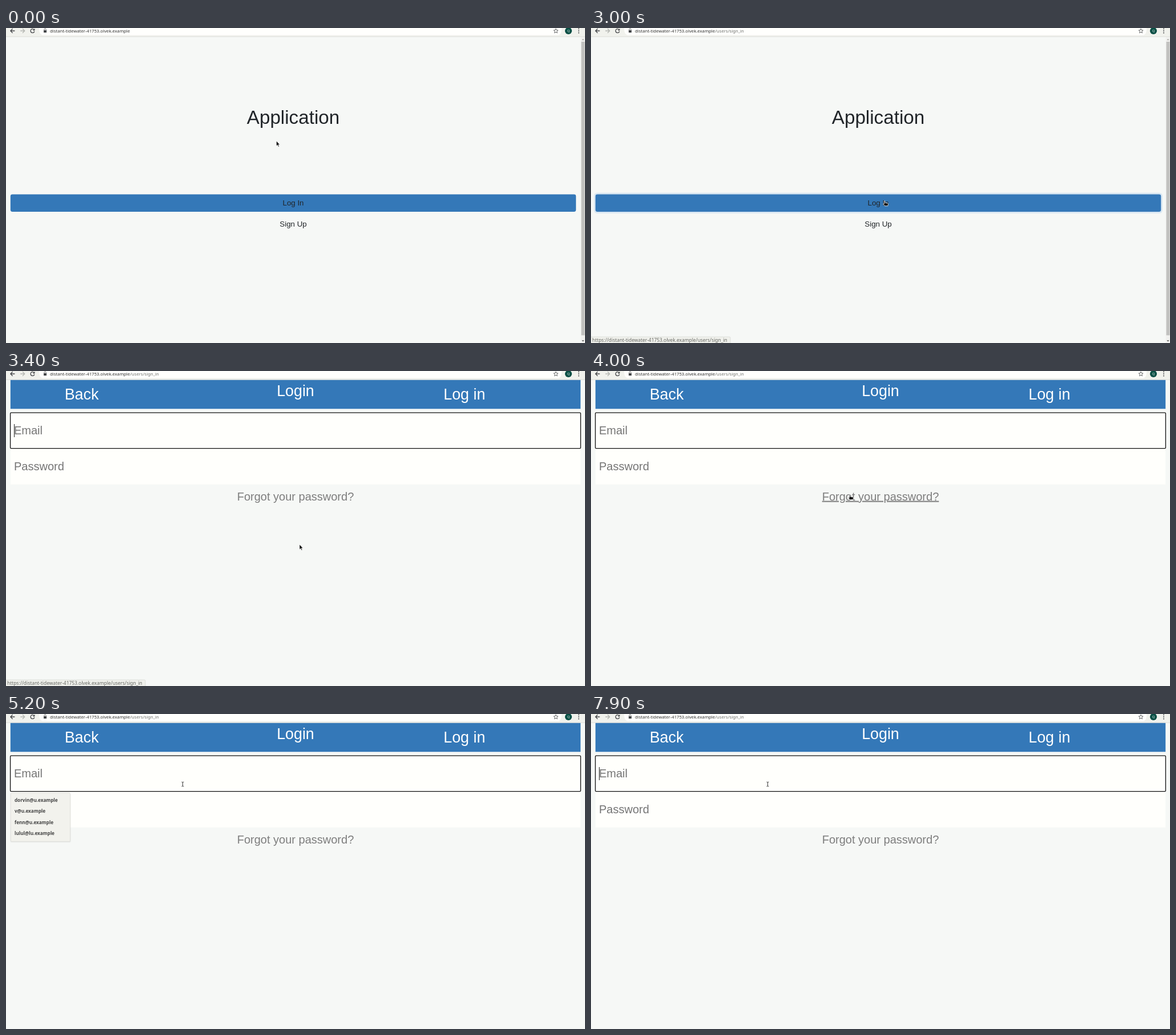
Animation, 1014 px wide and 552 px high, one loop 8 s. Source, as an HTML page:

```html
<!DOCTYPE html>
<html lang="en">
<head>
<meta charset="utf-8">
<title>Login walkthrough</title>
<style>
  html, body { margin: 0; width: 100%; height: 100%; overflow: hidden; background: #f6f8f6; }
  svg { display: block; width: 100vw; height: 100vh; }
  text { font-family: "Liberation Sans", Arial, sans-serif; white-space: pre; }
  .ui, .ui text { font-family: "Noto Sans", "Open Sans", sans-serif; }
  .mid { text-anchor: middle; }
  .field { font-size: 20px; fill: #757575; }
  .bar { font-size: 26.8px; fill: #fff; }
</style>
</head>
<body>
<svg viewBox="0 0 1014 552" preserveAspectRatio="none">
  <rect width="1014" height="552" fill="#f6f8f6"/>

  <g id="home">
    <text class="mid" x="503" y="167.6" font-size="33.2" fill="#212529">Application</text>
    <rect id="ring" x="5.2" y="288.7" width="995.6" height="36.1" rx="5.6" fill="#bdd7f0"/>
    <rect x="7.8" y="291.4" width="990.4" height="30.6" rx="3.4" fill="#3478b8"/>
    <text class="mid" x="503" y="311.3" font-size="13.3" fill="#212529">Log In</text>
    <text class="mid" x="503" y="348.3" font-size="13.3" fill="#212529">Sign Up</text>
    <rect x="1006.5" y="16" width="7.5" height="536" fill="#f1f1ef"/>
    <rect x="1007.5" y="24" width="6" height="514.5" fill="#c1c1bf"/>
    <path d="M1008.3 21.3l2.2-2.4 2.2 2.4z" fill="#a5a5a3"/>
    <path d="M1008.3 547.2l2.2 2.4 2.2-2.4z" fill="#505050"/>
  </g>

  <g id="login">
    <rect x="7.8" y="15.5" width="998.4" height="50.8" fill="#3478b8"/>
    <text class="bar mid" x="132.5" y="49.8">Back</text>
    <text class="bar mid" x="507" y="44.3">Login</text>
    <text class="bar mid" x="802.8" y="49.8">Log in</text>
    <rect x="7.8" y="73" width="998.4" height="125.8" fill="#fffffc"/>
    <rect x="7.6" y="73.1" width="998.8" height="62.6" rx="1.4" fill="none" stroke="#101010" stroke-width="1.3"/>
    <text id="email" class="field" x="14" y="111.2"></text>
    <rect id="caret" y="93" width="1" height="23" fill="#222"/>
    <text class="field" x="14" y="174.2">Password</text>
    <text id="forgot" class="mid" x="507" y="226.6" font-size="20" fill="#7d7d7d">Forgot your password?</text>
    <g id="menu" class="ui" font-size="8.1" font-weight="600" fill="#444">
      <rect x="7.5" y="139" width="106" height="86" rx="2" fill="#000" opacity=".07"/>
      <rect x="8.3" y="138.3" width="104" height="84.9" rx="1.5" fill="#f2f2ed" stroke="#d9d9d4" stroke-width=".6"/>
    </g>
  </g>

  <g class="ui">
    <rect width="1014" height="15" fill="#f1f2ed"/>
    <rect y="14.6" width="1014" height="1" fill="#dcddd8"/>
    <path d="M58 0H973Q973 12.6 966 12.6H66Q58 12.6 58 0z" fill="#fffffd"/>
    <g fill="none" stroke="#45474a" stroke-width="1.3">
      <path d="M15.4 5H8.2M11.6 1.3L7.9 5l3.7 3.7"/>
      <path d="M25.2 5h7.2M29 1.3L32.7 5 29 8.7" stroke="#b4b6b2"/>
      <path d="M49.2 3A3.4 3.4 0 1 0 49.8 5.8"/>
      <path d="M66.9 4.2V2.8a1.6 1.6 0 0 1 3.2 0v1.4" stroke-width=".8"/>
      <path d="M963 1.2l1.1 2.6 2.8.2-2.1 1.9.6 2.8-2.4-1.5-2.4 1.5.6-2.8-2.1-1.9 2.8-.2z" stroke-width=".8"/>
    </g>
    <path d="M50.4.8v3.6h-3.6zM66 3.9h5v4.2h-5z" fill="#45474a"/>
    <text x="77" y="7.7" font-size="7.7" fill="#333"><tspan id="host"></tspan><tspan id="path" fill="#70726f"></tspan></text>
    <circle cx="985" cy="5" r="6.1" fill="#0b5046"/>
    <text class="mid" x="985" y="7.2" font-size="6" fill="#e8f0ec">Q</text>
    <g fill="#45474a">
      <circle cx="1003" cy="1.6" r="1"/><circle cx="1003" cy="5.1" r="1"/><circle cx="1003" cy="8.6" r="1"/>
    </g>
  </g>

  <g id="status" class="ui">
    <path d="M-1 541.2H242.4Q244 541.2 244 543V553H-1z" fill="#f0f1ec" stroke="#d3d4cf" stroke-width=".7"/>
    <text id="link" x="2" y="549.8" font-size="8.4" fill="#666863"></text>
  </g>

  <g id="arrow">
    <path d="M0 0V8.7L2 6.9 3.5 10.2 4.9 9.6 3.4 6.4H6.1z" fill="#0c0c0c" stroke="#fff" stroke-width=".6"/>
  </g>
  <g id="hand">
    <path d="M2.4 1.2Q3.3.3 4.1 1.2V4.1L8.6 4.9Q9.7 5.2 9.5 6.4L8.8 9.6H3.6L.7 6.5Q.6 5.3 2.4 6z" fill="#111" stroke="#fff" stroke-width=".8"/>
  </g>
  <g id="beam">
    <path d="M-1.9-3.9Q0-3.9 0-2.9Q0-3.9 1.9-3.9M0-3V3M-1.9 3.9Q0 3.9 0 2.9Q0 3.9 1.9 3.9" fill="none" stroke="#3a3a3a" stroke-width="1"/>
  </g>
</svg>

<script>
const LOOP = 8000;
const HOST = "distant-tidewater-41753.olvek.example";
const PATH = "/users/sign_in";
const MAILS = ["dorvin@u.example", "v@u.example", "fenn@u.example", "lulul@lu.example"];
const $ = id => document.getElementById(id);

// Each track lists [start time, values...]; a value holds until the next one.
const pointer = [
  [0, "arrow", 473.5, 198], [400, "arrow", 479, 216], [500, "arrow", 493, 262],
  [600, "arrow", 503, 300], [700, "hand", 505, 313], [1000, "hand", 505, 312],
  [1400, "hand", 508, 306], [1500, "hand", 511, 302.2],
  [3400, "arrow", 514, 304], [3600, "arrow", 512, 296], [3700, "arrow", 505, 281],
  [3800, "arrow", 495, 264.5], [4000, "hand", 450, 216],
  [4200, "beam", 396, 170], [4300, "beam", 358, 146], [4400, "beam", 335, 133],
  [4500, "beam", 320, 127], [4600, "beam", 312, 124], [4700, "beam", 310, 123],
  [4800, "beam", 309.5, 123]
];
const status = [[0, 0], [700, .5], [1000, 1], [3600, .7], [3800, .35], [4000, 0]];
const ring = [[0, 0], [3000, .5], [3100, 1]];
const menu = [[0, 0], [4800, 1], [6500, .55], [6600, 0]];
const caret = [[0, 1], [4000, 0], [4500, 1], [5200, 0], [5800, 1], [7500, 0], [7900, 1]];
const typed = [[0, ""], [6500, "M"], [6600, "ME"], [6700, "MEs"], [7100, "ME"], [7300, "M"], [7500, ""]];

const at = (track, t) => track.findLast(step => step[0] <= t).slice(1);
const show = (id, on) => $(id).setAttribute("visibility", on ? "visible" : "hidden");
const fade = (id, v) => $(id).setAttribute("opacity", v);

$("host").textContent = HOST;
$("link").textContent = "https://" + HOST + PATH;
MAILS.forEach((mail, i) => {
  const row = document.createElementNS("http://www.w3.org/2000/svg", "text");
  row.setAttribute("x", 15);
  row.setAttribute("y", 154 + 19.3 * i);
  row.textContent = mail;
  $("menu").append(row);
});

function drawEmail(t) {
  const [word] = at(typed, t);
  const email = $("email");
  email.textContent = word || "Email";
  email.style.fill = word ? "#111" : "#757575";
  $("caret").setAttribute("x", 14 + (word ? email.getComputedTextLength() - .5 : 0));
  fade("caret", at(caret, t)[0]);
}

function draw(t) {
  const onLogin = t >= 3400;
  $("home").style.display = onLogin ? "none" : "";
  $("login").style.display = onLogin ? "" : "none";
  $("path").textContent = t >= 3000 ? PATH : "";
  fade("ring", at(ring, t)[0]);
  fade("status", at(status, t)[0]);
  fade("menu", at(menu, t)[0]);
  if (onLogin) drawEmail(t);
  $("forgot").setAttribute("text-decoration", t >= 4000 && t < 4200 ? "underline" : "none");

  const [kind, x, y] = at(pointer, t);
  for (const id of ["arrow", "hand", "beam"]) show(id, id === kind);
  $(kind).setAttribute("transform", `translate(${x} ${y})`);
}

const start = performance.now();
function tick() {
  draw((performance.now() - start) % LOOP);
  requestAnimationFrame(tick);
}
tick();
</script>
</body>
</html>
```
